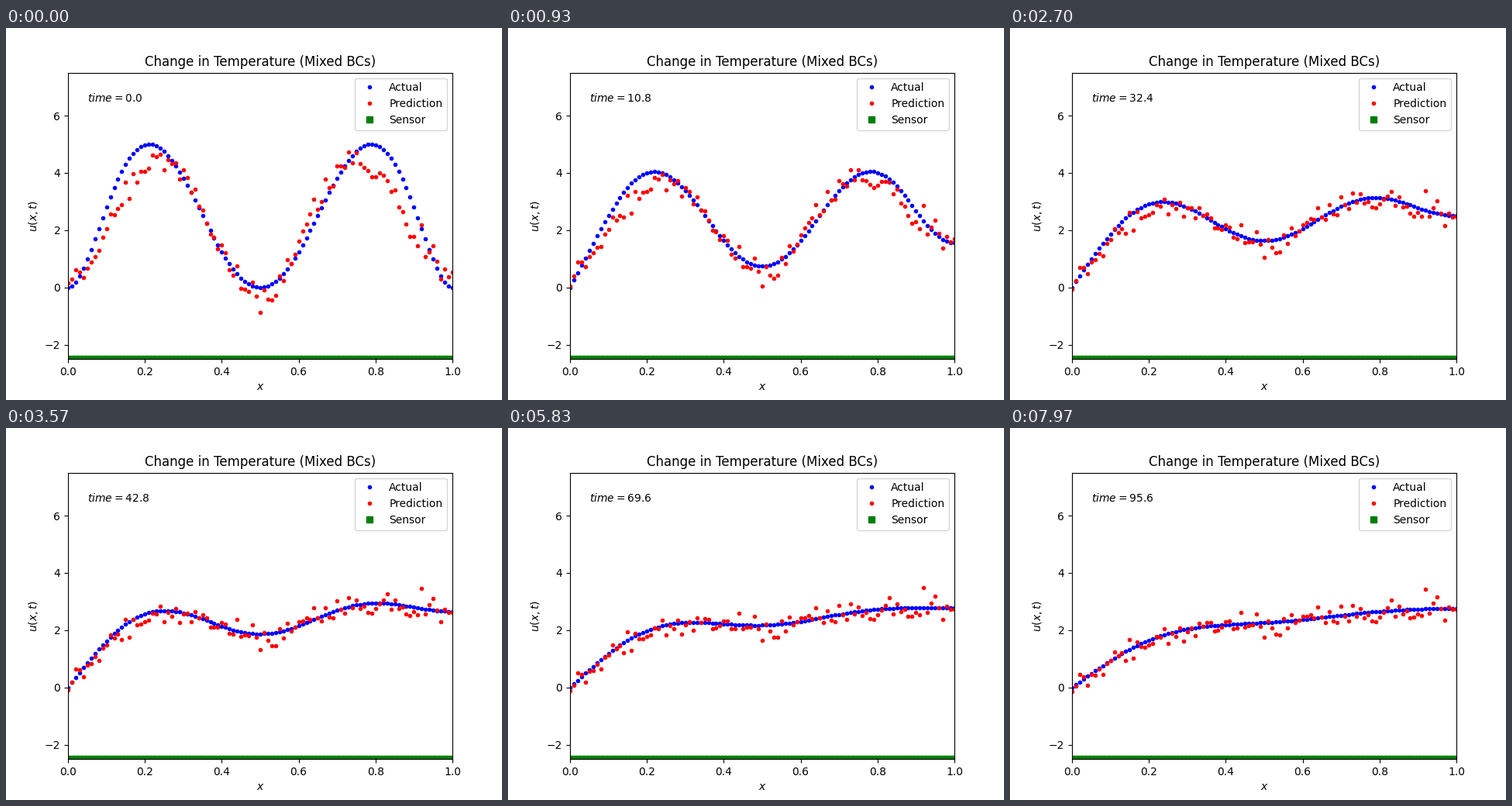
A matplotlib script for the animation above (8000 ms loop, 640 by 480 pixels).

```python
import numpy as np
import matplotlib.pyplot as plt
from matplotlib.animation import FuncAnimation

FRAMES = 240
STEP = 0.4            # simulated time per frame
DIFFUSIVITY = 3e-4
MODES = 120

x = np.linspace(0, 1, 101)


def initial(s):
    return 2160 * (s * (1 - s) * (s - 0.5)) ** 2


# Heat equation with u(0) = 0 and u'(1) = 0, solved by a sine series.
waves = (np.arange(MODES) + 0.5) * np.pi
fine = np.linspace(0, 1, 4001)
weights = 2 * np.sin(np.outer(waves, fine)) @ initial(fine) / 4000
basis = np.sin(np.outer(x, waves))


def actual(t):
    return basis @ (weights * np.exp(-DIFFUSIVITY * waves ** 2 * t))


def through(*points):
    return np.interp(x, *zip(*points))


# Prediction error: lasting noise with a few outliers, plus two fading biases.
rng = np.random.default_rng(4)
noise = rng.normal(-0.03, 0.17, x.size)
outliers = {0.44: 0.4, 0.5: -0.5, 0.53: -0.42, 0.54: -0.45,
            0.64: 0.37, 0.92: 0.7, 0.95: 0.4, 0.97: -0.4}
for place, error in outliers.items():
    noise[round(place * 100)] = error

slow = through((0, 0.3), (0.04, -0.1), (0.08, -0.6), (0.13, -1.05), (0.19, -0.85),
               (0.23, -0.55), (0.3, 0.15), (0.38, 0.05), (0.5, -0.2), (0.6, 0.1),
               (0.66, 0.2), (0.75, 0))
slow += rng.normal(0, 0.1, x.size)
fast = through((0.25, 0), (0.3, 0.1), (0.5, -0.1), (0.65, 0.3), (0.72, 0),
               (0.8, -0.9), (0.85, -1.15), (0.9, -0.9), (0.94, -0.2), (0.98, 0.4),
               (1, 0.5))


def predicted(t):
    return actual(t) + noise + slow * np.exp(-0.04 * t) + fast * np.exp(-0.12 * t)


plt.rcParams["font.family"] = "DejaVu Sans"
fig, ax = plt.subplots(figsize=(6.4, 4.8), dpi=100)
ax.set(xlim=(0, 1), ylim=(-2.5, 7.5), xlabel="$x$", ylabel="$u(x,t)$",
       title="Change in Temperature (Mixed BCs)")
blue, = ax.plot(x, actual(0), "b.", markersize=6, label="Actual")
red, = ax.plot(x, predicted(0), "r.", markersize=6, label="Prediction")
ax.plot(x, np.full_like(x, -2.5), "gs", markersize=6, label="Sensor")
clock = ax.text(0.05, 6.5, "")
ax.legend(loc="upper right")


def update(i):
    t = i * STEP
    blue.set_ydata(actual(t))
    red.set_ydata(predicted(t))
    clock.set_text(f"$time = {t:.1f}$")
    return blue, red, clock


anim = FuncAnimation(fig, update, frames=FRAMES, interval=8000 / FRAMES,
                     repeat=True, repeat_delay=0)
plt.show()
```
